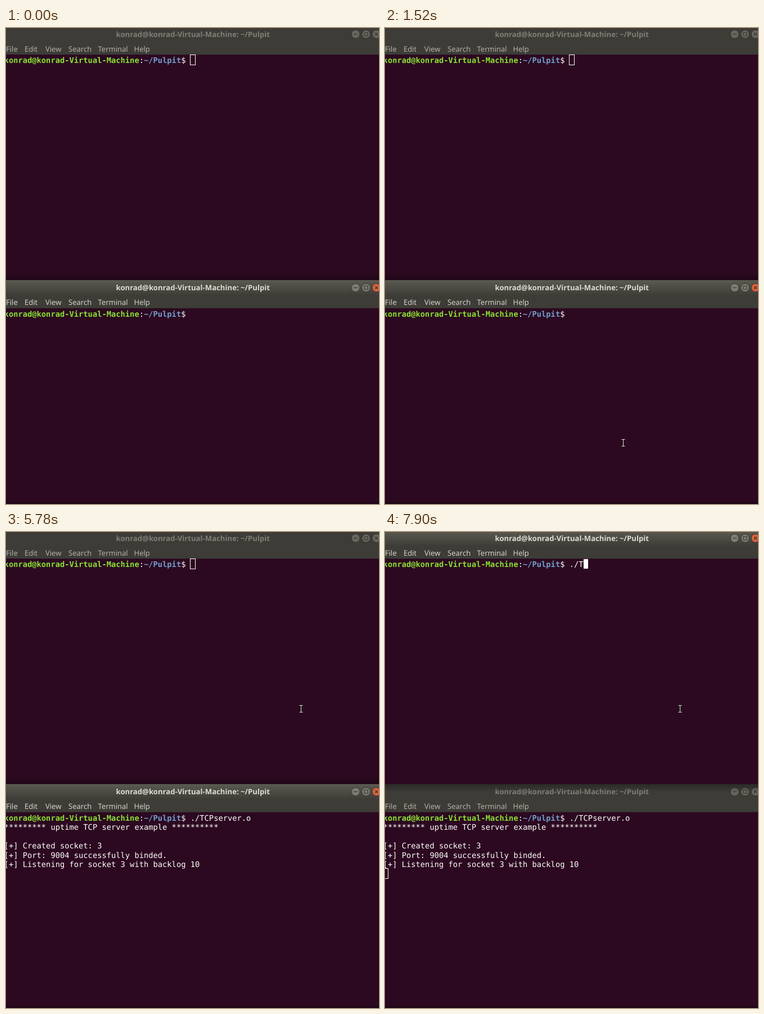
An HTML page for the animation above (8 s loop, 663 px wide and 844 px high).

```html
<!DOCTYPE html>
<html lang="en">
<head>
<meta charset="utf-8">
<title>Two terminals</title>
<style>
  html, body { margin: 0; width: 100%; height: 100%; overflow: hidden; background: #2c0920; }
  svg { display: block; width: 663px; height: 844px; }
  text { white-space: pre; text-rendering: geometricPrecision; }
  .title { font: bold 13.15px "Open Sans", sans-serif; }
  .menu { font: 13.1px "Open Sans", sans-serif; }
  .term { font: 13.76px "DejaVu Sans Mono", monospace; fill: #fff; }
  .prompt { font-weight: bold; }
  .user { fill: #8ae234; }
  .path { fill: #729fcf; }
  .off .title { fill: #807e77; }
  .off .menu { fill: #bab7af; }
  .on .title, .on .menu { fill: #dfdbd2; }
  .button { fill: #66655e; stroke: #33322e; }
  .on .button { fill: #7c7b71; }
  .on .close { fill: #d9633b; }
  .sign { fill: none; stroke: #36352f; stroke-width: 1.1; }
</style>
</head>
<body>
<svg id="stage" viewBox="0 0 663 844">
  <defs>
    <linearGradient id="bar" x2="0" y2="1">
      <stop stop-color="#5b5a51"/><stop offset="1" stop-color="#3d3c37"/>
    </linearGradient>
    <linearGradient id="fade" x2="0" y2="1">
      <stop stop-color="#000" stop-opacity="0"/><stop offset="1" stop-color="#000" stop-opacity=".3"/>
    </linearGradient>
  </defs>
</svg>
<script>
const LOOP = 8000, COL = 8.284, ROW = 16.57, LEFT = -3.4;
const BODY_TOP = 49.7, CELL_TOP = 50.7, BASE = 64.5, SPLIT = 447;
const HOST = 'konrad@konrad-Virtual-Machine', DIR = '~/Pulpit', COMMAND = './TCPserver.o ';
const PROMPT_COLS = 40;
const OUTPUT = [
  '********* uptime TCP server example **********',
  '',
  '[+] Created socket: 3',
  '[+] Port: 9004 successfully binded.',
  '[+] Listening for socket 3 with backlog 10'
];
const MENU = { File: 0, Edit: 33, View: 70, Search: 111, Terminal: 163.5, Help: 227.5 };
const stage = document.getElementById('stage');

const line = (row, text) =>
  `<text class="term" x="${LEFT}" y="${BASE + row * ROW}">${text}</text>`;

const button = (x, sign, extra = '') => `<g transform="translate(${x} 13.5)">
  <circle class="button ${extra}" r="7.5"/><path class="sign" d="${sign}"/></g>`;

const chrome = (state, fill) => `<g class="${state}">
  <rect width="663" height="${BODY_TOP}" fill="#3d3c37"/>
  <rect width="663" height="27" fill="${fill}"/>
  <text class="title" x="195.5" y="18">${HOST}: ${DIR}</text>
  ${Object.entries(MENU).map(([name, x]) => `<text class="menu" x="${x}" y="44">${name}</text>`).join('')}
  ${button(621.5, 'M-3.5 0H3.5')}
  ${button(640, 'M-3-3H3V3H-3Z')}
  ${button(658.5, 'M-2.5-2.5 2.5 2.5M2.5-2.5-2.5 2.5', 'close')}
</g>`;

function addWindow(id, y, tracks) {
  stage.insertAdjacentHTML('beforeend', `
    <clipPath id="${id}Clip"><rect width="0" height="${BODY_TOP}"/></clipPath>
    <g id="${id}" transform="translate(0 ${y})">
      <rect y="${BODY_TOP}" width="663" height="400" fill="#2c0920"/>
      ${chrome('off', '#3d3c37')}
      <g clip-path="url(#${id}Clip)">${chrome('on', 'url(#bar)')}</g>
      ${line(0, `<tspan class="prompt"><tspan class="user">${HOST}</tspan></tspan>:<tspan class="prompt path">${DIR}</tspan>$ <tspan class="typed"></tspan>`)}
      <g class="output">${OUTPUT.map((text, i) => line(i + 1, text)).join('')}</g>
    </g>
    <rect id="${id}Cursor"/>`);
  const find = name => stage.querySelector(`#${id} .${name}`);
  return {
    ...tracks, y,
    lit: stage.querySelector(`#${id}Clip rect`),
    input: find('typed'), output: find('output'),
    cursor: document.getElementById(`${id}Cursor`)
  };
}

// Each track is a list of [start time, value].
const upper = addWindow('upper', -2.5, {
  focus: [[0, 0], [6100, 663]],
  typed: [[0, 0], [7180, 1], [7500, 2], [7900, 3]],
  caret: [[0, 'box'], [6100, 'solid'], [6650, 'none'], [7180, 'solid']],
  done: LOOP
});
const lower = addWindow('lower', SPLIT, {
  focus: [[0, 663], [530, 0], [1060, 339], [1140, 663], [6100, 0]],
  typed: [[0, 0], [2060, 1], [2290, 2], [3070, 3], [3300, 4], [3450, 5],
          [3700, 6], [3930, 7], [4000, 8], [4310, 14]],
  caret: [[0, 'none'], [530, 'box'], [1060, 'solid'], [1520, 'none'],
          [2060, 'solid'], [5470, 'none'], [6100, 'box']],
  done: 4940
});
stage.insertAdjacentHTML('beforeend', `
  <rect id="shadow" y="-14" width="663" height="14" fill="url(#fade)"/>
  <rect y="840.5" width="663" height="4" fill="#1e0717"/>
  <g id="pointer" fill="none">
    <path d="M-3-6H3M-3 6H3M0-6V6" stroke="#111" stroke-width="2.4"/>
    <path d="M-3-6H3M-3 6H3M0-6V6" stroke="#e8e6e3"/>
  </g>`);
const pointer = document.getElementById('pointer');
const shadow = document.getElementById('shadow');
const mouse = [
  [0, [-20, -20]],
  [530, [540.5, 38.5]], [605, [505.5, 250.5]], [680, [450.5, 570.5]], [750, [423.5, 735.5]],
  [5550, [470.5, 640.5]], [5625, [555.5, 450.5]], [5700, [548.5, 345.5]], [5780, [524.5, 313.5]]
];

const at = (track, t) => track.findLast(([start]) => start <= t)[1];

function setAttrs(el, attrs) {
  for (const name in attrs) el.setAttribute(name, attrs[name]);
}

// The cursor snaps to whole pixels; the outlined one sits half a pixel outside.
function drawCursor(el, left, top, style) {
  const x = Math.round(left), y = Math.round(top);
  const width = Math.round(left + COL) - x, height = Math.round(top + ROW) - y;
  el.setAttribute('visibility', style === 'none' ? 'hidden' : 'visible');
  setAttrs(el, style === 'box'
    ? { x: x - 0.5, y: y - 0.5, width: width + 1, height: height + 1, fill: 'none', stroke: '#fff' }
    : { x, y, width, height, fill: '#fff', stroke: 'none' });
}

function drawWindow(w, t) {
  const done = t >= w.done, count = at(w.typed, t);
  w.lit.setAttribute('width', at(w.focus, t));
  w.input.textContent = COMMAND.slice(0, count);
  w.output.setAttribute('visibility', done ? 'visible' : 'hidden');
  const col = done ? 0 : PROMPT_COLS + count, row = done ? OUTPUT.length + 1 : 0;
  drawCursor(w.cursor, LEFT + col * COL, w.y + CELL_TOP + row * ROW, at(w.caret, t));
}

function draw(t) {
  drawWindow(upper, t);
  drawWindow(lower, t);
  // The window in front casts its shadow across the split.
  shadow.setAttribute('transform', `translate(0 ${SPLIT}) scale(1 ${at(upper.focus, t) ? -1 : 1})`);
  pointer.setAttribute('transform', `translate(${at(mouse, t)})`);
}

const begin = performance.now();
function tick() {
  draw((performance.now() - begin) % LOOP);
  requestAnimationFrame(tick);
}
tick();
</script>
</body>
</html>
```
